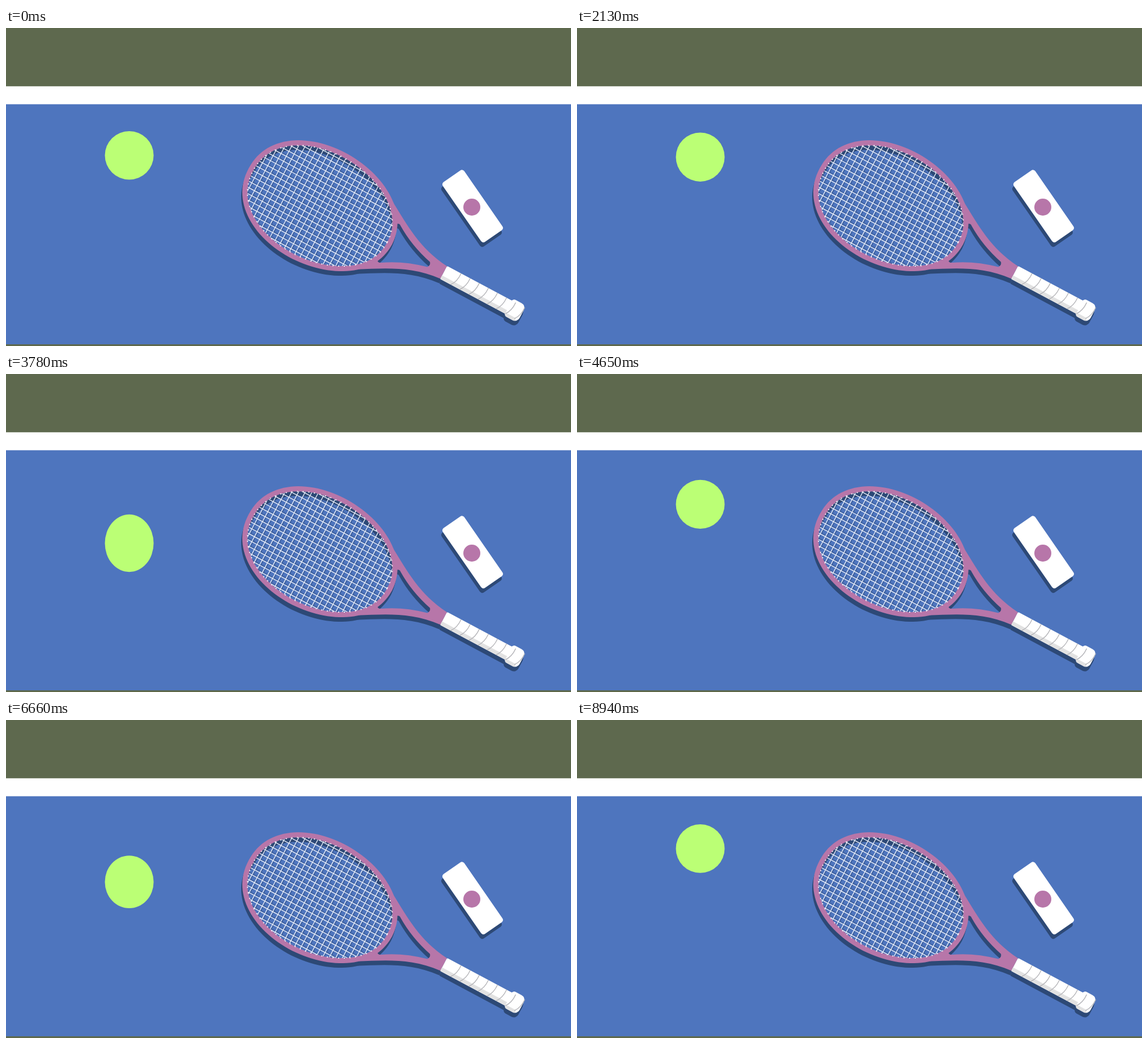
An HTML page with a canvas that plays this animation: 997 by 561 pixels, repeating every 8.97 s.

```html
<!DOCTYPE html>
<html lang="en">
<head>
<meta charset="utf-8">
<title>Tennis ball</title>
<style>
  html, body { margin: 0; width: 100%; height: 100%; overflow: hidden; background: #4e75be; }
  canvas { display: block; width: 997px; height: 561px; }
</style>
</head>
<body>
<canvas id="stage" width="997" height="561"></canvas>
<script>
const W = 997, H = 561;
const OLIVE = '#5e694e', BLUE = '#4e75be', NAVY = '#2d4976', PINK = '#b776a9', LIME = '#bbff75';
const LOOP = 8970, STEP = 30, BOUNCE = 528.8;
const ctx = document.getElementById('stage').getContext('2d');

// Racket parts lie along the x axis, with the head centred on the origin.
function oval(a, b) {
  const path = new Path2D();
  for (let i = 0; i < 120; i++) {
    const angle = i * Math.PI / 60, c = Math.cos(angle), s = Math.sin(angle);
    path.lineTo(a * c, b * Math.sign(s) * Math.abs(s) ** 0.92 * (1 - 0.03 * c));
  }
  path.closePath();
  return path;
}

function box(x, y, w, h, r) {
  const path = new Path2D();
  path.roundRect(x, y, w, h, r);
  return path;
}

const hole = oval(134, 95.5), rim = oval(138.5, 100);
const arms = new Path2D(
  'M110 67C150 44 190 17 247 12.5V-12.5C190 -17 150 -44 110 -67C148 -38 148 38 110 67Z' +
  'M133 -36Q137 -40 141 -37Q175 -15 217 -5Q221 0 217 5Q175 15 141 37Q137 40 133 36Q154 0 133 -36Z');
const grip = box(247, -13, 134, 26, 2);
const cap = box(376, -17, 27, 34, [6, 9, 9, 6]);

// Draws in a moved and turned frame; the shadow falls by (-2, 8).
function place(g, x, y, degrees, draw) {
  g.save();
  g.translate(x, y);
  g.rotate(degrees * Math.PI / 180);
  draw();
  g.restore();
}

function withShadow(g, x, y, degrees, draw) {
  place(g, x - 2, y + 8, degrees, () => draw(true));
  place(g, x, y, degrees, () => draw(false));
}

function strings(g, shadow) {
  g.save();
  g.strokeStyle = shadow ? 'rgba(45,73,118,.5)' : '#e6ebf6';
  g.lineWidth = 1.4;
  g.beginPath();
  for (let y = -90; y <= 90; y += 10) { g.moveTo(-140, y); g.lineTo(140, y); }
  for (let x = -126; x <= 126; x += 10.5) { g.moveTo(x, -105); g.lineTo(x, 105); }
  g.clip(hole);
  g.stroke();
  g.restore();
}

function frame(g, shadow) {
  g.fillStyle = g.strokeStyle = shadow ? NAVY : PINK;
  g.lineWidth = 9;
  g.stroke(rim);
  g.fill(arms, 'evenodd');
}

function handle(g, shadow) {
  g.fillStyle = shadow ? NAVY : '#fff';
  g.fill(grip);
  g.fill(cap);
  if (shadow) return;
  g.fillStyle = '#e2e2e2';
  g.fillRect(247, 6, 130, 7);
  g.fill(box(378, 11, 20, 6, 4));
  g.strokeStyle = '#b5b5b9';
  g.lineWidth = 1.4;
  g.beginPath();
  for (let i = 0; i < 8; i++) {
    const x = 275 + 18.2 * i;
    g.moveTo(x, -13);
    g.quadraticCurveTo(x + 1, 3, x - 7, 13);
  }
  g.stroke();
}

function racket(g) {
  withShadow(g, 554.4, 314.9, 28.1, shadow => {
    strings(g, shadow);
    frame(g, shadow);
    handle(g, shadow);
    if (shadow) return;
    g.strokeStyle = '#f3edf5';
    g.lineWidth = 2;
    g.setLineDash([2, 8]);
    g.stroke(hole);
    g.setLineDash([]);
  });
}

function card(g) {
  withShadow(g, 823.5, 314.3, 55.3, shadow => {
    g.fillStyle = shadow ? NAVY : '#fff';
    g.fill(box(-64.2, -23, 128.4, 46, 5));
  });
  g.fillStyle = PINK;
  g.beginPath();
  g.arc(822, 316, 15, 0, 2 * Math.PI);
  g.fill();
}

function court() {
  const c = document.createElement('canvas');
  c.width = W;
  c.height = H;
  const g = c.getContext('2d');
  const band = (color, y, h) => { g.fillStyle = color; g.fillRect(0, y, W, h); };
  band(OLIVE, 0, H);
  band('#fff', 102.8, 33);
  band(BLUE, 134.5, 423.5);
  racket(g);
  card(g);
  return c;
}

// Smooth fall, short rest on the ground, quick rebound that slows towards the top.
// drop is 0 at the top and 1 on the ground.
function ball(t) {
  const falling = t < 244;
  const rise = Math.max(0, t - 244) ** 3;
  const drop = falling
    ? (1 - Math.cos(Math.PI * Math.min(1, t / 205))) / 2
    : 1 - rise / (rise + 50 ** 3);
  const stretch = (falling ? 22 : 13) * 4 * drop * (1 - drop);
  return { y: 224.7 + 231 * drop, height: 85.5 - 10.5 * drop + stretch };
}

const scene = court();
const start = performance.now();

function draw(now) {
  const time = Math.floor(Math.max(0, now - start) % LOOP / STEP) * STEP;
  const { y, height } = ball(time % BOUNCE);
  ctx.drawImage(scene, 0, 0);
  ctx.fillStyle = LIME;
  ctx.beginPath();
  ctx.ellipse(217.5, y, 43, height / 2, 0, 0, 2 * Math.PI);
  ctx.fill();
  requestAnimationFrame(draw);
}
draw(start);
</script>
</body>
</html>
```
